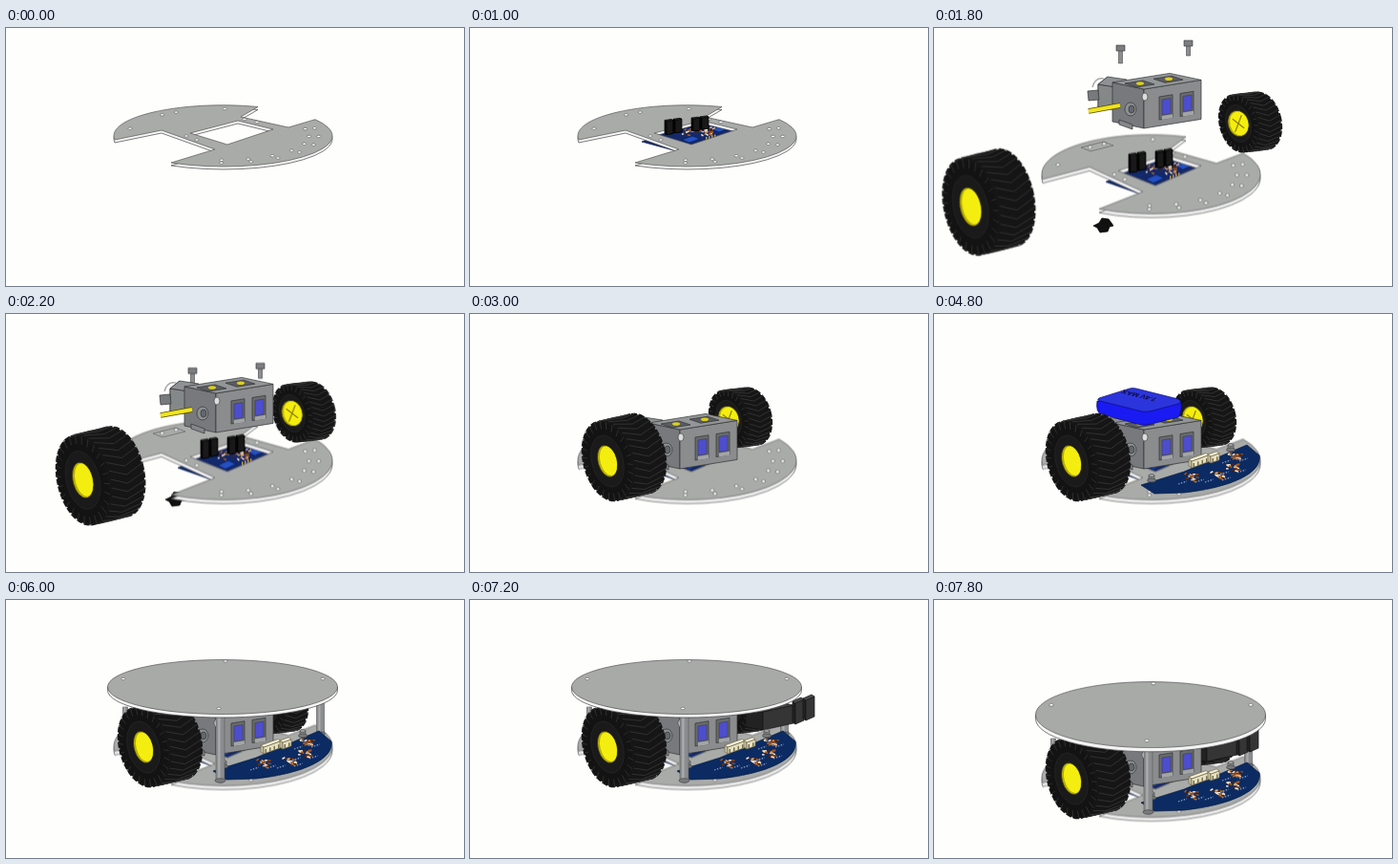
An HTML page for the animation above (8 s loop, 480 by 270 pixels).

```html
<!DOCTYPE html>
<html>
<head>
<meta charset="utf-8">
<style>
html, body { margin: 0; width: 100%; height: 100%; overflow: hidden; background: #fefefd; }
svg { display: block; width: 480px; height: 270px; }
path, ellipse, rect { vector-effect: non-scaling-stroke; }
text { font: bold 8px "Liberation Sans", sans-serif; }
</style>
</head>
<body>
<svg id="stage" viewBox="0 0 480 270"></svg>
<script>
const LOOP = 8000, STEP = 200;
const stage = document.getElementById('stage');

let seed = 7;
const rnd = () => (seed = (seed * 16807) % 2147483647) / 2147483647;
const range = (n, f) => Array.from({ length: n }, (_, i) => f(i)).join('');

// Pose at time t, linear between keys [t, x, y, scaleX, scaleY]
function pose(keys, t) {
  const next = keys.findIndex(k => k[0] > t);
  if (next === 0) return keys[0];
  if (next < 0) return keys[keys.length - 1];
  const a = keys[next - 1], b = keys[next], k = (t - a[0]) / (b[0] - a[0]);
  return a.map((v, i) => v + (b[i] - v) * k);
}

function part(parent, html, { keys = [[0, 0, 0, 1, 1]], on = keys[0][0], off = LOOP, origin = '0 0' } = {}) {
  const g = document.createElementNS('http://www.w3.org/2000/svg', 'g');
  g.innerHTML = html;
  g.style.transformOrigin = origin;
  parent.append(g);
  const frames = [];
  for (let t = 0; t <= LOOP; t += STEP) {
    const at = Math.min(t, LOOP - STEP);
    const [, x, y, sx, sy] = pose(keys, at);
    frames.push({
      offset: t / LOOP,
      transform: `translate(${x}px,${y}px) scale(${sx},${sy})`,
      opacity: at >= on && at < off ? 1 : 0,
      easing: 'step-end'
    });
  }
  g.animate(frames, { duration: LOOP, iterations: Infinity });
  return g;
}

// Arrive from an offset / leave towards an offset
const arrive = (t0, t1, x, y, sx = 1, sy = 1) => [[t0, x, y, sx, sy], [t1, 0, 0, 1, 1]];
const leave = (t0, t1, x, y) => [[t0, 0, 0, 1, 1], [t1, x, y, 1, 1]];

const path = (d, fill, stroke = '#333', w = .7, more = '') =>
  `<path d="${d}" fill="${fill}" stroke="${stroke}" stroke-width="${w}" ${more}/>`;
const oval = (x, y, rx, ry, fill, stroke = 'none', w = .7, more = '') =>
  `<ellipse cx="${x}" cy="${y}" rx="${rx}" ry="${ry}" fill="${fill}" stroke="${stroke}" stroke-width="${w}" ${more}/>`;
const box = (x, y, w, h, fill, stroke = 'none') =>
  `<rect x="${x}" y="${y}" width="${w}" height="${h}" fill="${fill}" stroke="${stroke}" stroke-width=".6"/>`;
const hole = (x, y) => oval(x, y, 2.1, 1.2, '#fff', '#555', .6);

// Parallelogram from one corner and two edges
const quad = (x, y, [ux, uy], [vx, vy], fill, stroke) =>
  path(`M${x},${y}l${ux},${uy}l${vx},${vy}l${-ux},${-uy}z`, fill, stroke);
// Block seen from its near top corner: u runs right, v runs back
const block = (x, y, u, v, h, [top, side, front], stroke) =>
  quad(x, y, v, [0, h], side, stroke) + quad(x, y, u, [0, h], front, stroke) + quad(x, y, u, v, top, stroke);

const screw = (x, y, h) => box(x - 2, y + 5, 4, h - 5, '#8b8d90', '#444') + box(x - 4.5, y, 9, 6, '#7b7d80', '#333');
const post = (x, y, w, h) =>
  box(x - w / 2, y, w, h, '#8a8d8f', '#555') + box(x - w / 4, y, w / 4, h, '#a9abad') +
  oval(x, y + h, w / 2 + 1, w / 4, '#777a7c', '#444');

// Soldered parts scattered around a point
function chips(x, y, w, h, n) {
  const tints = ['#f3ead8', '#a8602c', '#e0b483', '#4a2612', '#8c4a20'];
  return range(n, i =>
    path(`M${x + (rnd() - .5) * w},${y + (rnd() - .5) * h}l${2 + rnd() * 2},${rnd() * 4 - 2}`, 'none', tints[i % 5], 1.5));
}

// Tyre as a tilted cylinder from the near face (x, y) to (x + dx, y + dy)
function wheel(x, y, rx, ry, dx, dy, hx, hy) {
  const tilt = -15, c = Math.cos(tilt * Math.PI / 180), s = Math.sin(tilt * Math.PI / 180);
  const at = (k, a, r = 1) => {
    const px = rx * r * Math.cos(a), py = ry * r * Math.sin(a);
    return `${x + dx * k + px * c - py * s},${y + dy * k + px * s + py * c}`;
  };
  const disc = (k, w, h, fill, stroke, sw, more = '') =>
    oval(x + dx * k, y + dy * k, w, h, fill, stroke, sw, `transform="rotate(${tilt} ${x + dx * k} ${y + dy * k})" ${more}`);
  const lugs = range(18, i => {
    const a = -1.75 + i * .19;
    return path(`M${at(.05, a)}L${at(.5, a + .17)}L${at(1, a)}`, 'none', '#353535', .9);
  });
  const wall = range(26, i => path(`M${at(0, i * .242, .8)}L${at(0, i * .242)}`, 'none', '#2e2e2e', 1));
  return range(9, i => disc(1 - i / 8, rx - 1, ry - 1, '#161616', '#161616', 2.4, 'stroke-dasharray="6 2"')) + lugs +
    disc(0, rx * .94, ry * .94, '#131313', 'none') + wall + disc(0, rx * .64, ry * .64, '#1a1a1a', '#2c2c2c', .6) +
    disc(0, hx, hy, '#b8ac00', '#222', .8) + disc(.03, hx - 1.5, hy - 1.5, '#f4ee10', 'none');
}

const scene = part(stage, '', { keys: [[7400, 0, 0, 1, 1], [7600, 0, 13, 1, 1], [7800, 0, 33, 1, 1]], on: 0 });

// Parts coming from below
part(scene, path('M167,207l6,-3l3,-5l7,1l3,4l2,3l-4,1l-2,5l-8,1l-3,-5z', '#111', '#000'),
  { keys: leave(1800, 2800, 0, -32), off: 3000 });
part(scene, screw(224, 236, 12) + screw(329, 196, 12), { keys: leave(5400, 6000, 0, -50), off: 6000 });

// Lower plate with its circuit board; the view tilts once
const base = part(scene, '', { keys: [[1200, 0, 0, 1, 1], [1800, 0, 7.5, 1, 1.29]], on: 0 });
const pins = range(4, i => block(206 + i * 9 + (i > 1) * 10, 97.5 - i * 1.2, [7, -1], [-2, -1], 14 - i * .6, ['#333', '#080808', '#191919'], '#000'));
const bluePad = (x, y) => quad(x, y, [11, -4], [8, 3], '#2450c4', '#0b1d55');
part(base, quad(180, 119, [62, -23], [44, 12], '#14296a', '#0a1a50') +
  bluePad(222, 117) + bluePad(253, 106) + chips(238, 108, 32, 8, 42) +
  range(4, i => box(247 + i * 3, 114 - i * .8, 1.5, 4, '#c9a24a')) + pins,
  { keys: arrive(600, 1000, 0, 74) });

const rim = 'M114,117A114,32 0 0 1 264,82.500L246,93L296,104L324,95.700A114,32 0 0 1 173,141' +
  'L219,127L163,107ZM193,110L243,97L280,106L232,122Z';
const evenOdd = 'fill-rule="evenodd"';
const onRim = (deg, r) => hole(227.5 + 114 * r * Math.cos(deg * Math.PI / 180), 113 + 32 * r * Math.sin(deg * Math.PI / 180));
part(base, path(rim, '#f5f5f5', '#444', .7, `${evenOdd} transform="translate(0 3)"`) +
  path(rim, '#a9aba9', '#555', .7, evenOdd) +
  range(7, i => onRim(i * 18 - 17, .88) + onRim(i * 18 - 17, .79)) +
  [196, 231, 241, 271].map(a => onRim(a, .89)).join('') +
  range(2, i => hole(189 + i * 11, 113 + i * 4) + hole(250 + i * 13, 95.5 + i * 3)));
part(base, pins, { on: 1000 });
part(scene, quad(154, 125, [24, -6], [10, 4], 'none', '#666'), { on: 1800, off: 2800 });

// Far wheel and far posts
part(scene, wheel(271, 110, 20, 31, 25, -3, 11, 14) +
  range(4, i => path(`M271,110l${7 * Math.cos(i * 1.57 + .5)},${10 * Math.sin(i * 1.57 + .5)}`, 'none', '#8d7f00', 1.2)),
  { keys: arrive(1800, 2800, 48, -10) });
part(scene, post(329.5, 104, 8, 36) + post(125, 112, 5, 30), { keys: arrive(5400, 6000, 0, -32) });

// Range sensor
const darks = ['#4a4a4a', '#222', '#353535'];
part(scene, block(286, 117, [32, -7], [-18, -3], 19, darks, '#151515') +
  range(2, i => block(320 + i * 11, 108 - i * 3, [9, -4], [-3, -2], 22 - i, darks, '#151515')),
  { keys: arrive(6600, 7400, 84, 0) });

// Drive unit
part(scene, screw(195.5, 18, 19) + screw(266.5, 13, 16), { keys: leave(1800, 2800, 0, 96), off: 2800 });
const across = w => [w, -w * .16];
const slot = (x, y) => quad(x, y, across(14), [0, 24], '#686b6d') +
  quad(x + 3, y + 3, across(9), [0, 16], '#4d4dd0', '#444') + quad(x + 3, y + 20, across(11), [0, 4], '#a2a4a6', 'none');
const vent = x => quad(x, 119 - (x - 212) * .16, across(19), [-12, -4], '#5b5e61') + oval(x + 4, 115 - (x - 212) * .16, 4, 1.8, '#ddd01c');
part(scene,
  path('M178,110q-9,-2 -12,9', 'none', '#aaa', 1.4) +
  block(172, 116, [20, 3], [10, -8], 24, ['#8f9294', '#777a7c', '#858889']) +
  quad(161, 123, [11, -1], [1, 10], '#777a7d') +
  block(220, 121, across(60), [-33, -7], 41, ['#939698', '#77797c', '#8a8c8e']) +
  vent(212) + vent(242) + slot(236, 129) + slot(258, 125.5) +
  oval(221, 129, 3, 4, '#ddd', '#444') + oval(206, 142, 6, 7, '#8d9093', '#333') + oval(207, 142, 3, 4, '#65686b', '#333') +
  quad(194, 153, [14, 5], [0, 5], '#85888b') +
  path('M162,144L195,138', 'none', '#504800', 5.6) + path('M162,144L195,138', 'none', '#f0e41c', 4.2),
  { keys: arrive(1800, 3000, 0, -57) });

// Battery
part(scene,
  path('M171,91Q169,103 176,105L216,116Q222,117 228,115L256,108Q260,104 259,92Z', '#1a1af2', '#0b0b60') +
  path('M173,88L205,78Q208,77 212,78L256,89Q261,92 256,94L226,102Q220,103 214,101L174,91Q170,90 173,88Z', '#2c35dc', '#0d0d70') +
  '<text transform="translate(234 88) rotate(194) skewX(-25) scale(1 .75)" fill="#0a0a3c">7.4V MAX</text>',
  { keys: arrive(3600, 4800, 0, -65) });

// Front circuit board
const cream = ['#f6f1da', '#c9c3a2', '#e6dfc0'];
const socket = (x, y, n) => block(x, y, [n * 4.5, -n * 1.6], [-3, -2], 7, cream, '#6b6546') +
  range(n, i => box(x + 1.5 + i * 4.5, y + 2 - i * 1.6, 1.5, 4, '#77704e'));
const knob = (x, y) => box(x - 3, y - 4, 6, 5, '#898c8e', '#444') + oval(x, y + 1, 4.5, 2, '#777a7d', '#444') + oval(x, y - 4, 3, 1.4, '#aaa', '#444');
const cluster = (x, y) => chips(x, y, 13, 7, 22) +
  path(`M${x - 12},${y + 7}l9,-3M${x + 6},${y + 5}l9,-3`, 'none', '#8fa2c2', 1.2, 'stroke-dasharray="1.500 1.500"');
part(scene,
  path('M217,179L262,165L328,137L341,148A112,38 0 0 1 262,187L231,188Z', '#0c2b62', '#061a40') +
  cluster(268, 171) + cluster(296, 169) + cluster(312, 161) + cluster(314, 149) +
  socket(270, 154, 4) + socket(290, 149, 2) + knob(228, 173) + knob(311, 141),
  { keys: arrive(3600, 4800, 0, -45, 1.06, 1.06), origin: '230px 160px' });

// Near wheel
part(scene, wheel(144, 154, 25.5, 43, 35, -8, 10, 17),
  { keys: arrive(1800, 2800, -104, 32, 1.1, 1.22), origin: '162px 149px' });

// Top deck
part(scene, post(224.5, 112, 9, 77), { keys: arrive(5400, 6000, 0, -32) });
part(scene,
  path('M106.500,91v3.500A120.500,28.500 0 0 0 347.500,94.500V91Z', '#f5f5f5', '#444') +
  oval(227, 91, 120.5, 28.5, '#a8aaa8', '#555') +
  hole(230, 64) + hole(223, 113.5) + hole(123, 82.5) + hole(332, 82.5),
  {
    keys: [...arrive(5400, 6000, 0, -31, 1.035, 1.035), [7400, 0, 0, 1, 1], [7600, 0, -2, 1, 1.08], [7800, 0, -4, 1, 1.21]],
    origin: '227px 91px'
  });
</script>
</body>
</html>
```
